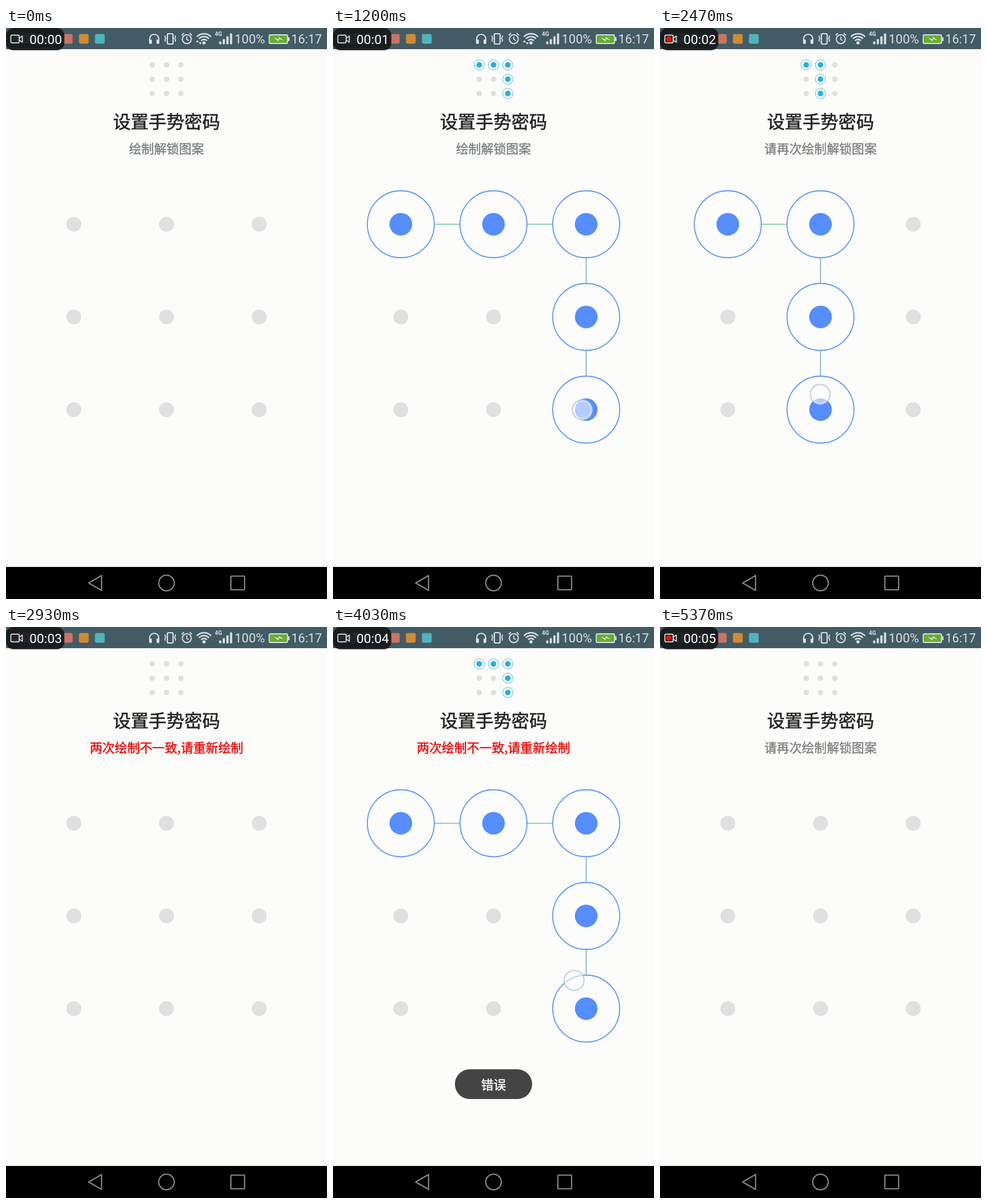
An HTML page with a canvas for the animation above (5.41 s loop, 561 by 998 pixels).

```html
<!DOCTYPE html>
<html lang="zh-CN">
<head>
<meta charset="utf-8">
<style>
html, body { margin: 0; width: 100%; height: 100%; overflow: hidden; background: #fcfcfb; }
canvas { display: block; }
</style>
</head>
<body>
<canvas id="stage" width="561" height="998"></canvas>
<script>
const ctx = document.getElementById('stage').getContext('2d');
const LOOP = 5410, TAU = Math.PI * 2;
const PAPER = '#fcfcfb', ICON = '#d9e0e3';
const HAN = '"Noto Sans CJK SC", "Noto Sans CJK", "Noto Sans", sans-serif';
const LATIN = 'Roboto, sans-serif';

const nodes = Array.from({ length: 9 }, (_, i) => ({ col: i % 3, row: Math.floor(i / 3) }))
  .map(n => ({ ...n, x: 118.5 + n.col * 162, y: 343 + n.row * 162 }));

// Finger strokes: [time, x, y]
const strokes = [
  [[470, 112, 348], [570, 190, 338], [670, 268, 330], [770, 345, 327], [890, 436, 352],
   [1010, 434, 490], [1130, 428, 620], [1220, 438, 680], [1310, 440, 692]],
  [[1960, 112, 348], [2060, 225, 340], [2150, 320, 336], [2200, 337, 352], [2300, 296, 460],
   [2390, 282, 560], [2470, 280, 640], [2580, 280, 680], [2760, 280, 688]],
  [[3430, 112, 348], [3570, 235, 336], [3680, 345, 330], [3790, 436, 352],
   [3910, 432, 490], [4030, 421, 617], [4120, 448, 676], [4220, 490, 690], [4270, 490, 692]]
].map(points => {
  const start = points[0][0], end = points.at(-1)[0], hits = [];
  for (let t = start; t <= end; t += 5) {
    const p = fingerAt(points, t);
    const node = nodes.find(n => Math.hypot(n.x - p.x, n.y - p.y) < 59);
    if (node && !hits.some(h => h.node === node)) hits.push({ node, t });
  }
  return { points, start, end, hits };
});

function fingerAt(points, t) {
  const i = Math.max(1, points.findIndex(p => p[0] >= t));
  const [t0, x0, y0] = points[i - 1], [t1, x1, y1] = points[i];
  const k = (t - t0) / (t1 - t0);
  return { x: x0 + (x1 - x0) * k, y: y0 + (y1 - y0) * k };
}

const clamp = v => Math.max(0, Math.min(1, v));

function paint(fill, stroke, width = 2) {
  if (fill) { ctx.fillStyle = fill; ctx.fill(); }
  if (stroke) { ctx.strokeStyle = stroke; ctx.lineWidth = width; ctx.stroke(); }
}
function disc(x, y, r, fill, stroke, width) {
  ctx.beginPath(); ctx.arc(x, y, r, 0, TAU); paint(fill, stroke, width);
}
function box(x, y, w, h, r, fill, stroke, width) {
  ctx.beginPath(); ctx.roundRect(x, y, w, h, r); paint(fill, stroke, width);
}
function shape(d, fill, stroke, width) {
  const path = new Path2D(d);
  if (fill) { ctx.fillStyle = fill; ctx.fill(path); }
  if (stroke) { ctx.strokeStyle = stroke; ctx.lineWidth = width; ctx.stroke(path); }
}
function text(s, x, y, size, color, family = LATIN, align = 'left', weight = 400) {
  ctx.font = `${weight} ${size}px ${family}`;
  ctx.textAlign = align;
  ctx.fillStyle = color;
  ctx.fillText(s, x, y);
}
// Centred Chinese text, thickened to a weight between regular and medium
function label(s, y, size, color) {
  text(s, 280.5, y, size, color, HAN, 'center');
  ctx.strokeStyle = color;
  ctx.lineWidth = size * .02;
  ctx.strokeText(s, 280.5, y);
}

function drawStatusBar(t) {
  box(0, 0, 561, 37, 0, '#435b65');
  text('星国通信', 10, 26, 19, '#c5ced2', HAN);
  box(99.5, 10.5, 17, 17, 3, '#cc7263');
  box(127.5, 10.5, 17, 17, 3, '#d08b32');
  box(155.5, 10.5, 17, 17, 3, '#4fb4be');

  // Headphones, vibrate, alarm
  shape('M251 22v-3a8 8 0 0 1 16 0v3', null, ICON, 2.2);
  box(250, 20, 5, 8, 2, ICON);
  box(263, 20, 5, 8, 2, ICON);
  box(282, 10, 10, 18, 2, null, ICON, 2.2);
  shape('M278 13v3l1.5 2-1.5 2v4M296 13v3l-1.5 2 1.5 2v4', null, ICON, 1.8);
  disc(316, 19.5, 7.8, null, ICON, 2);
  shape('M316 15v5l3.5 2M307 13l4-4M325 13l-4-4', null, ICON, 1.8);

  // Wi-Fi and mobile signal
  for (const r of [7, 12, 17]) {
    ctx.beginPath();
    ctx.arc(346, 27, r, -Math.PI * .76, -Math.PI * .24);
    paint(null, ICON, 2.4);
  }
  disc(346, 26, 2.8, ICON);
  if (t < 1330) shape('M332 25l2.5-4 2.5 4zM337 25l2.5 4 2.5-4z', ICON);
  text('4G', 365, 14, 10, ICON, LATIN, 'left', 700);
  [5, 9, 14, 19].forEach((h, i) => box(372.5 + i * 6.3, 28.5 - h, 3.8, h, 1, ICON));

  text('100%', 399.5, 27, 22, ICON);
  box(460, 12, 32, 15, 2, '#68ad30', ICON, 1.8);
  box(493, 16, 2.5, 7, 1, ICON);
  shape('M468 17l8 3 1-4 8 5.5-8-2.5-1 4z', '#f4f6f4');
  text('16:17', 552, 27, 21.5, ICON, LATIN, 'right');
}

function drawRecorder(t) {
  box(0, 0, 102, 39, 13, 'rgba(18,20,21,.86)');
  box(8.5, 12.5, 14.5, 13.5, 2, null, '#fff', 1.5);
  shape('M23 18l5.5-4v11l-5.5-4', null, '#fff', 1.5);
  const phase = t % 1000;
  if (phase >= 335 && phase < 835) disc(15.5, 19.3, 5, '#f00c0c');
  const seconds = [830, 1330, 2830, 3830, 4830].filter(at => t >= at).length;
  text('00:0' + seconds, 41, 27.5, 22.8, '#fff');
}

function drawNavigation() {
  box(0, 942, 561, 56, 0, '#000');
  ctx.lineJoin = 'round';
  shape('M144.5 970L167 957V983Z', null, '#858585', 2.2);
  disc(280.5, 970, 13.6, null, '#858585', 2.2);
  box(393, 958, 24, 24, 1, null, '#858585', 2.2);
}

function drawLine(a, b) {
  const flat = Math.abs(b.x - a.x) > Math.abs(b.y - a.y);
  ctx.beginPath();
  ctx.moveTo(a.x, a.y);
  ctx.lineTo(b.x, b.y);
  paint(null, flat ? '#74bfa9' : '#72a9d2', 1.6);
}

function drawPattern(t) {
  const stroke = strokes.find(s => t >= s.start && t < s.end);
  const lit = stroke ? stroke.hits.filter(h => h.t <= t).map(h => h.node) : [];
  const finger = stroke && fingerAt(stroke.points, t);

  lit.forEach((n, i) => drawLine(n, lit[i + 1] || finger));
  for (const n of nodes) {
    const sx = 255.5 + n.col * 25, sy = 64.5 + n.row * 25;
    if (lit.includes(n)) {
      disc(n.x, n.y, 58.5, PAPER, '#6096f2', 1.8);
      disc(n.x, n.y, 19.8, '#568dff');
      disc(sx, sy, 9, null, '#55bbd6', 1);
      disc(sx, sy, 4.9, '#2bafdf');
    } else {
      disc(n.x, n.y, 13, '#e0e0e0');
      disc(sx, sy, 4.8, '#e0e0e0');
    }
  }
  if (finger) {
    disc(finger.x, finger.y, 17.3, 'rgba(255,255,255,.55)', 'rgba(178,188,224,.7)', 2.4);
    disc(finger.x, finger.y, 15.3, null, 'rgba(255,255,255,.6)', 1.5);
  }
}

function drawMessages(t) {
  label('设置手势密码', 174.8, 31.2, '#242424');
  const [message, color] =
    t < 1310 ? ['绘制解锁图案', '#7c8084'] :
    t >= 2760 && t < 4270 ? ['两次绘制不一致,请重新绘制', '#ee0808'] :
    ['请再次绘制解锁图案', '#808080'];
  label(message, 218.5, 21.85, color);

  ctx.globalAlpha = clamp((t - 3000) / 200) * clamp((5360 - t) / 180);
  box(213, 773, 135, 52, 26, '#444');
  label('错误', 807.5, 21.85, '#fff');
  ctx.globalAlpha = 1;
}

function frame() {
  const t = performance.now() % LOOP;
  box(0, 0, 561, 998, 0, PAPER);
  drawStatusBar(t);
  drawRecorder(t);
  drawMessages(t);
  drawPattern(t);
  drawNavigation();
  requestAnimationFrame(frame);
}
frame();
</script>
</body>
</html>
```
